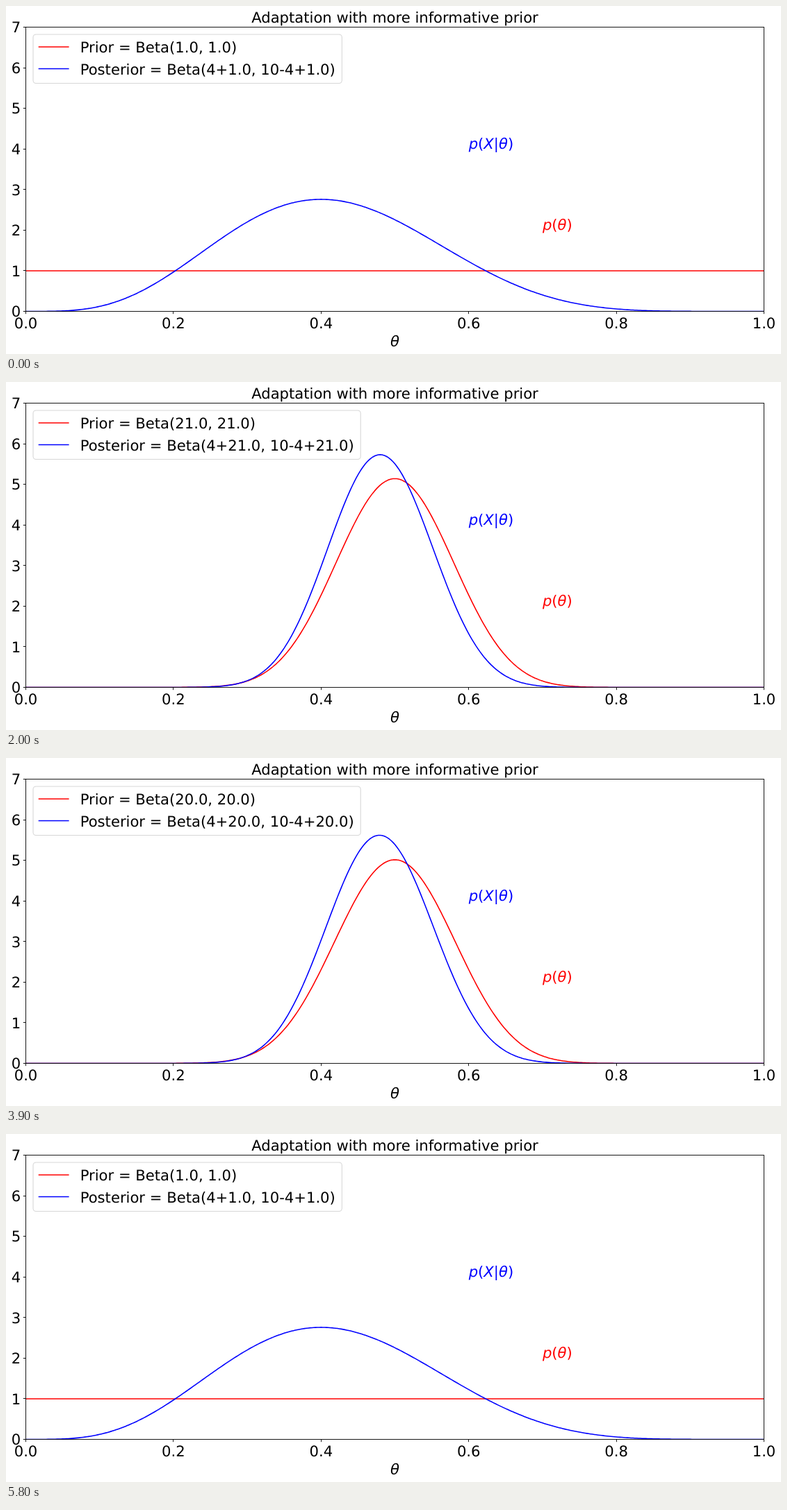
Write an HTML page that moves like this. It is 1115 px wide and 502 px high and loops after 5.9 s.

```html
<!DOCTYPE html>
<html lang="en">
<head>
<meta charset="utf-8">
<title>Adaptation with more informative prior</title>
<style>
  html, body { margin: 0; width: 100%; height: 100%; overflow: hidden; background: #fff; }
  svg { display: block; width: 1115px; height: 502px; }
  text { font: 21.13px "DejaVu Sans", sans-serif; text-rendering: geometricPrecision; white-space: pre; }
  .math { font-style: oblique; }
  .math tspan { font-style: normal; }
  .line { fill: none; stroke-width: 1.58; stroke-linejoin: round; }
  .axis { fill: none; stroke: #000; stroke-width: .9; }
  .prior { stroke: #f00; }
  .posterior { stroke: #00f; }
</style>
</head>
<body>
<svg viewBox="0 0 1115 502">
  <clipPath id="plot"><rect x="28.5" y="30.5" width="1062" height="410"/></clipPath>
  <g clip-path="url(#plot)">
    <path id="priorCurve" class="line prior"/>
    <path id="posteriorCurve" class="line posterior"/>
  </g>
  <path id="ticks" class="axis"/>
  <rect class="axis" x="28.5" y="30.5" width="1062" height="410"/>
  <g id="labels"></g>
  <text x="559.5" y="24.2" text-anchor="middle">Adaptation with more informative prior</text>
  <text class="math" x="559.5" y="490.5" text-anchor="middle">θ</text>
  <text class="math" x="665.7" y="206.2" fill="#00f">p<tspan>(</tspan>X<tspan>|</tspan>θ<tspan>)</tspan></text>
  <text class="math" x="771.9" y="323.3" fill="#f00">p<tspan>(</tspan>θ<tspan>)</tspan></text>

  <rect id="legendBox" x="39" y="41" height="70.5" rx="4.2" fill="#fff" fill-opacity=".8"
        stroke="#ccc" stroke-opacity=".8" stroke-width="1.06"/>
  <path class="line prior" d="M46.7 59H90.6"/>
  <path class="line posterior" d="M46.7 90.5H90.6"/>
  <text id="priorLabel" x="106.7" y="67"></text>
  <text id="posteriorLabel" x="106.7" y="99"></text>
</svg>
<script>
const STEP = 100, STEPS = 59, PEAK = 30, SAMPLES = 400;
const HEADS = 4, TOSSES = 10;
const $ = id => document.getElementById(id);
const toX = v => 28.5 + 1062 * v;
const toY = v => 440.5 - 410 / 7 * v;
const snap = v => Math.floor(v) + 0.5;

// log((n - 1)!)
function logGamma(n) {
  let sum = 0;
  for (let i = 2; i < n; i++) sum += Math.log(i);
  return sum;
}

function betaPath(a, b) {
  const scale = Math.exp(logGamma(a + b) - logGamma(a) - logGamma(b));
  let d = "";
  for (let i = 0; i <= SAMPLES; i++) {
    const x = i / SAMPLES;
    const density = scale * x ** (a - 1) * (1 - x) ** (b - 1);
    d += (i ? "L" : "M") + toX(x).toFixed(2) + " " + toY(density).toFixed(2);
  }
  return d;
}

function addLabel(text, x, y, anchor) {
  const label = document.createElementNS("http://www.w3.org/2000/svg", "text");
  label.setAttribute("x", x);
  label.setAttribute("y", y);
  label.setAttribute("text-anchor", anchor);
  label.textContent = text;
  $("labels").append(label);
}

function drawAxes() {
  let d = "";
  for (let i = 0; i <= 5; i++) {
    const x = toX(i / 5);
    d += `M${snap(x)} 440.5v3.7`;
    addLabel((i / 5).toFixed(1), x, 465, "middle");
  }
  for (let i = 0; i <= 7; i++) {
    const y = toY(i);
    d += `M28.5 ${snap(y)}h-3.7`;
    addLabel(i, 21.1, y + 7.8, "end");
  }
  $("ticks").setAttribute("d", d);
}

function show(strength) {
  const s = strength.toFixed(1);
  $("priorCurve").setAttribute("d", betaPath(strength, strength));
  $("posteriorCurve").setAttribute("d", betaPath(HEADS + strength, TOSSES - HEADS + strength));
  $("priorLabel").textContent = `Prior = Beta(${s}, ${s})`;
  $("posteriorLabel").textContent = `Posterior = Beta(${HEADS}+${s}, ${TOSSES}-${HEADS}+${s})`;
  $("legendBox").setAttribute("width", strength < 10 ? 444.3 : 471.2);
}

const start = performance.now();
let shown = 0;

function tick() {
  const step = Math.floor((performance.now() - start) / STEP) % STEPS;
  const strength = PEAK - Math.abs(step - PEAK + 1);
  if (strength !== shown) show(shown = strength);
  requestAnimationFrame(tick);
}

drawAxes();
tick();
</script>
</body>
</html>
```
